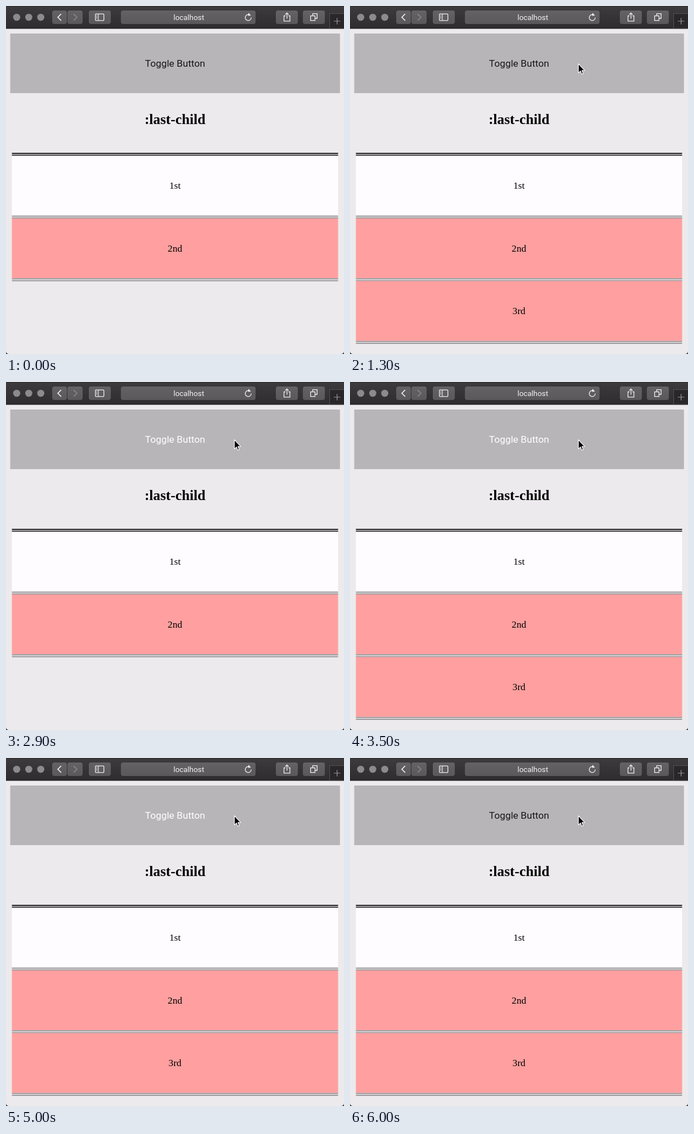
An HTML page that plays this animation: 600x619 px, repeating every 6800 ms.

```html
<!DOCTYPE html>
<html lang="en">
<head>
<meta charset="utf-8">
<title>:last-child</title>
<style>
  html, body { margin: 0; width: 100%; height: 100%; overflow: hidden; background: #eceaec; }
  svg { display: block; }
  text { text-anchor: middle; }
  .ui { font-family: Roboto, "Liberation Sans", sans-serif; }
  .serif { font-family: "Liberation Serif", Times, serif; }
  .icon { fill: none; stroke: #f1eff1; stroke-width: 1.3; }
</style>
</head>
<body>
<svg width="600" height="619" viewBox="0 0 600 619">
  <defs>
    <linearGradient id="bar" x2="0" y2="1">
      <stop offset="0" stop-color="#3d3b3d"/>
      <stop offset="1" stop-color="#2e2c2e"/>
    </linearGradient>
    <linearGradient id="key" x2="0" y2="1">
      <stop offset="0" stop-color="#646265"/>
      <stop offset="1" stop-color="#5a585b"/>
    </linearGradient>
  </defs>

  <rect width="600" height="619" fill="#eceaec"/>
  <rect width="600" height="40" fill="url(#bar)"/>
  <rect width="600" height="1" fill="#29272a"/>
  <rect y="39.5" width="600" height="1" fill="#171618"/>

  <g fill="#8c8a8d">
    <circle cx="19" cy="20" r="6.3"/>
    <circle cx="40.4" cy="20" r="6.3"/>
    <circle cx="61.7" cy="20" r="6.3"/>
  </g>
  <g id="keys" fill="url(#key)"></g>

  <g class="icon">
    <path d="M98 14l-6 6 6 6" stroke-width="1.7"/>
    <path d="M120 14l6 6-6 6" stroke="#8a888b" stroke-width="1.7"/>
    <rect x="158.700" y="14.200" width="15" height="11.600" rx="1"/>
    <path d="M164 14v12M160.300 17h2M160.300 19.500h2M160.300 22h2" stroke-width="1.1"/>
    <path d="M434.200 17.300A5.300 5.300 0 1 0 435.300 20.500"/>
    <path d="M430 12.300l3.800 2.900-3.800 2.900z" fill="#f1eff1" stroke="none"/>
    <path d="M496 17.500h-2.500v9.300h10.500v-9.300h-2.500M498.700 22.500v-9.500M495.700 15.300l3-3 3 3"/>
    <path d="M544.500 17.500v-3.800h7.800v8.300h-3.800"/>
    <rect x="540.700" y="17.500" width="7.800" height="8.300"/>
  </g>

  <rect x="574.500" y="13.500" width="26" height="26.500" fill="#29272a" stroke="#535154"/>
  <path d="M582 27h11.500M587.750 21.250v11.500" stroke="#9a989b" stroke-width="1.2"/>
  <text class="ui" x="324.500" y="25.400" font-size="13.400" fill="#f4f2f4">localhost</text>

  <rect x="7.500" y="49" width="585.300" height="106" fill="#b7b5b8"/>
  <text class="ui" id="label" x="300.200" y="108" font-size="17.200">Toggle Button</text>
  <text class="serif" x="300" y="210" font-size="25.300" font-weight="bold">:last-child</text>

  <g id="rows" class="serif" font-size="17.200"></g>

  <path d="M0 614v5h5a5 5 0 0 1-5-5zM600 614v5h-5a5 5 0 0 0 5-5z" fill="#3a3a3c"/>

  <path id="cursor" d="M.4.700V17.100L4.100 13.600 6.600 19.200 9 18.200 6.600 12.700H11.400Z"
        stroke="#fff" stroke-width="1.100" stroke-linejoin="round"/>
</svg>
<script>
const LOOP = 6800, TICK = 100;
const MOVE = { start: 300, end: 900, from: [230.5, 91.5], to: [405, 102] };
// [press, release] times; each release toggles the third row
const CLICKS = [[1000, 1300], [1900, 2200], [2700, 3000], [3500, 3700],
                [4200, 4400], [4900, 5200], [5800, 6000]];
const TOP = 261.3, PITCH = 111.5, LEFT = 10.5, WIDTH = 579;

const $ = id => document.getElementById(id);

function add(parent, tag, attrs, text = "") {
  const el = document.createElementNS("http://www.w3.org/2000/svg", tag);
  for (const k in attrs) el.setAttribute(k, attrs[k]);
  el.textContent = text;
  return parent.appendChild(el);
}

function box(parent, y, height, fill) {
  add(parent, "rect", { x: LEFT, y, width: WIDTH, height, fill });
}

function doubleLine(parent, y, color, gap) {
  box(parent, y, 5.2, gap);
  box(parent, y, 1.8, color);
  box(parent, y + 3.4, 1.8, color);
}

function row(i, name, fill) {
  const g = add($("rows"), "g", {});
  const y = TOP + i * PITCH;
  box(g, y + 5, PITCH - 5, fill);
  doubleLine(g, y + PITCH, "#969497", "#e4e2e4");
  add(g, "text", { x: 300, y: y + 64 }, name);
  return g;
}

for (const [x, width] of [[82, 26], [109, 27], [147, 39], [204, 239], [479, 39], [527, 39]])
  add($("keys"), "rect", { x, y: 8, width, height: 24, rx: 4 });

doubleLine($("rows"), TOP, "#0b0a0b", "#d8d6d8");
row(0, "1st", "#fefcff");
row(1, "2nd", "#ff9f9f");
const third = row(2, "3rd", "#ff9f9f");

const ease = p => 1 - (1 - p) ** 2;

function draw(now) {
  const t = Math.floor(now % LOOP / TICK) * TICK;
  const held = CLICKS.some(([down, up]) => t >= down && t < up);
  const toggles = CLICKS.filter(([, up]) => t >= up).length;
  $("label").setAttribute("fill", held ? "#fff" : "#171618");
  third.style.display = toggles % 2 ? "" : "none";

  const p = ease(Math.min(1, Math.max(0, (t - MOVE.start) / (MOVE.end - MOVE.start))));
  const [x, y] = MOVE.from.map((a, i) => a + (MOVE.to[i] - a) * p);
  $("cursor").style.display = t < MOVE.start ? "none" : "";
  $("cursor").setAttribute("transform", `translate(${x} ${y})`);
}

function frame() {
  draw(performance.now());
  requestAnimationFrame(frame);
}
frame();
</script>
</body>
</html>
```
